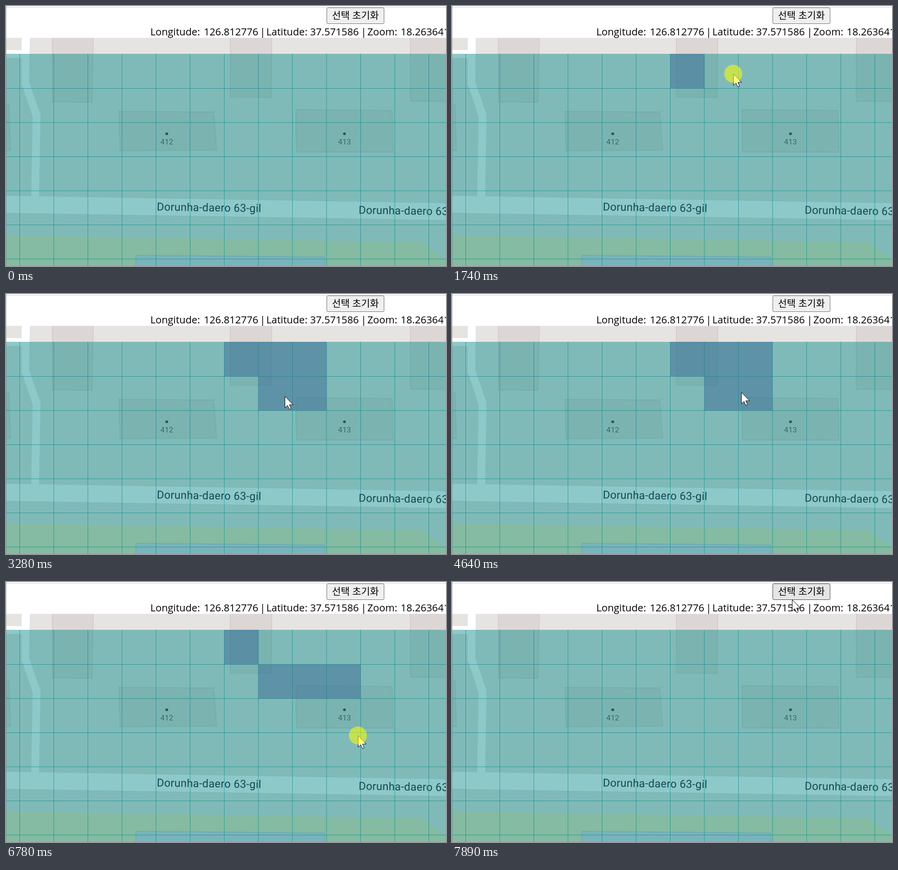
Write an HTML page that moves like this. It is 884 by 522 pixels and loops after 8000 ms.

```html
<!DOCTYPE html>
<html lang="ko">
<head>
<meta charset="utf-8">
<title>Grid selection</title>
<style>
  html, body { margin: 0; width: 100%; height: 100%; overflow: hidden; background: #fff; }
  svg { display: block; width: 884px; height: 522px; }
  .info { font: 20.2px "Open Sans", sans-serif; fill: #000; }
  .btn { font: 300 19.3px "Noto Sans CJK KR", "Noto Sans CJK", sans-serif; text-anchor: middle; }
  .road { font: 22px Roboto, sans-serif; letter-spacing: .3px; fill: #154b52; }
  .num { font: 15.5px Roboto, sans-serif; text-anchor: middle; fill: #2d6668; }
  .building { fill: #dcd7d4; stroke: #cdc7c6; stroke-width: 1.3; }
  .label { paint-order: stroke; stroke: #8cc4c3; stroke-width: 1.5px; stroke-opacity: .5; }
</style>
</head>
<body>
<svg viewBox="0 0 884 522">
  <clipPath id="map"><rect y="64" width="884" height="458"/></clipPath>
  <rect width="884" height="522" fill="#fff"/>
  <rect y="2" width="884" height="1" fill="#d6d6d6"/>

  <g clip-path="url(#map)">
    <rect y="64" width="884" height="458" fill="#e6e4e0"/>
    <g fill="#fff" stroke="#dadfe8" stroke-width="1.6">
      <path d="M-3 380L884 395V430.500L-3 416Z"/>
      <path d="M31 60V88H-3V105H31V156L53 222L50 381.500H67L70 218L47 152L48.500 60Z" stroke-width="1"/>
    </g>
    <path d="M51 379H66.500V384H51Z" fill="#fff"/>
    <path d="M0 460L250 464.500L837 474L867 498L884 507V522H0Z" fill="#ede6b8"/>
    <path d="M261 500.500L640 504V524H261Z" fill="#dbd8e6" stroke="#bfc4da" stroke-width="1.5"/>
    <g class="building">
      <path d="M93 60H175.500L173 193L93.500 192.500Z"/>
      <path d="M450.500 60H534L533 183.500L451 183Z"/>
      <path d="M812.500 60H890V192L812 191Z"/>
      <path d="M227 211.500L418 213L423 289L229 290.500Z"/>
      <path d="M582.500 208L776 210L777.500 293.500L583.500 293Z"/>
      <path d="M-3 196L6 197L9 290H-3Z"/>
    </g>
    <rect y="96" width="884" height="426" fill="#008686" fill-opacity=".443"/>
    <path id="grid" fill="none" stroke="#008a88" stroke-opacity=".65"/>
    <path id="cells" fill="#3c6c98" fill-opacity=".5"/>
  </g>
  <rect width="1" height="522" fill="#777" fill-opacity=".45"/>

  <g class="num label">
    <text x="323" y="278">412</text>
    <text x="680" y="278">413</text>
  </g>
  <g fill="#205a5d">
    <circle cx="323" cy="256.500" r="2.800"/>
    <circle cx="680" cy="256.500" r="2.800"/>
  </g>
  <g class="road label">
    <text transform="translate(303 410.500) rotate(.9)">Dorunha-daero 63-gil</text>
    <text transform="translate(708.500 417) rotate(.9)">Dorunha-daero 63-gil</text>
  </g>

  <rect id="button" x="644.500" y="3.500" width="115" height="32" rx="2.500"/>
  <text class="btn" x="702" y="26">선택 초기화</text>
  <text class="info" y="59">
    <tspan x="290">Longitude:</tspan> <tspan x="397.500">126.812776</tspan> <tspan x="510">|</tspan>
    <tspan x="523">Latitude:</tspan> <tspan x="611">37.571586</tspan> <tspan x="713">|</tspan>
    <tspan x="726">Zoom:</tspan> <tspan x="793">18.263641</tspan>
  </text>

  <g id="pointer">
    <path d="M.5 .5V23.500L5.700 18.700L9.300 26.500L12.700 25L9.200 17.300H16.700Z" fill="#fff" stroke="#111"/>
    <circle id="press" r="18" fill="#ff0" fill-opacity=".55"/>
  </g>
</svg>
<script>
const LOOP = 8000, ENTER = 130;
const PRESS = 100, DWELL = 150, LEAVE = 60;
const CELL = 68.5, LEFT = 27.5, TOP = 97, MAP_TOP = 96;
const $ = id => document.getElementById(id);

const move = (t, x, y) => ({ t, x, y });
const click = (t, x, y) => ({ t, x, y, click: true });

// Every click toggles the cell below it; the last one hits the reset button.
const steps = [
  move(ENTER, 846, 456),
  move(500, 605, 32),
  click(830, 449, 163),
  click(1810, 565, 136),
  click(2550, 615, 141),
  click(2860, 619, 185),
  click(3210, 560, 205),
  move(3720, 552, 224),
  move(4420, 546, 201),
  click(4900, 600, 195),
  click(5250, 612, 148),
  click(5820, 556, 139),
  click(6160, 598, 205),
  click(6440, 680, 200),
  click(6850, 707, 308),
  click(7270, 565, 218),
  click(7800, 683, 35)
];

const range = n => [...Array(n).keys()];
const gridPath = range(13).map(i => `M${LEFT + CELL * i} ${MAP_TOP}V522`)
  .concat(range(7).slice(1).map(i => `M0 ${TOP + CELL * i}H884`)).join("");
$("grid").setAttribute("d", gridPath);

const ease = p => p * p * (3 - 2 * p);
const clamp = p => Math.min(1, Math.max(0, p));

// Leaves each step shortly after it and settles shortly before the next.
function pointerAt(t) {
  const next = steps.findIndex(s => s.t > t);
  if (next < 1) return next ? steps[steps.length - 1] : steps[0];
  const a = steps[next - 1], b = steps[next];
  const start = a.t + LEAVE;
  const k = ease(clamp((t - start) / (b.t - DWELL - start)));
  return { x: a.x + (b.x - a.x) * k, y: a.y + (b.y - a.y) * k };
}

function cellsAt(t) {
  const selected = new Set();
  for (const s of steps.filter(s => s.click && s.t <= t)) {
    if (s.y < MAP_TOP) {
      selected.clear();
      continue;
    }
    const x = LEFT + CELL * Math.floor((s.x - LEFT) / CELL);
    const row = Math.floor((s.y - TOP) / CELL);
    const y = row ? TOP + CELL * row : MAP_TOP;
    const d = `M${x} ${y}H${x + CELL}V${TOP + CELL * (row + 1)}H${x}Z`;
    if (!selected.delete(d)) selected.add(d);
  }
  return [...selected].join("");
}

function draw(t) {
  const { x, y } = pointerAt(t);
  const hover = x > 644 && x < 760 && y < 36.5;
  const pressed = steps.some(s => s.click && t >= s.t - PRESS && t < s.t);
  $("cells").setAttribute("d", cellsAt(t));
  $("pointer").setAttribute("transform", `translate(${Math.round(x)} ${Math.round(y)})`);
  $("pointer").setAttribute("visibility", t < ENTER ? "hidden" : "visible");
  $("press").setAttribute("display", pressed ? "inline" : "none");
  $("button").setAttribute("fill", hover ? "#e5e5e5" : "#efefef");
  $("button").setAttribute("stroke", hover ? "#4f4f4f" : "#767676");
}

const start = performance.now();
function tick() {
  draw((performance.now() - start) % LOOP);
  requestAnimationFrame(tick);
}
tick();
</script>
</body>
</html>
```
